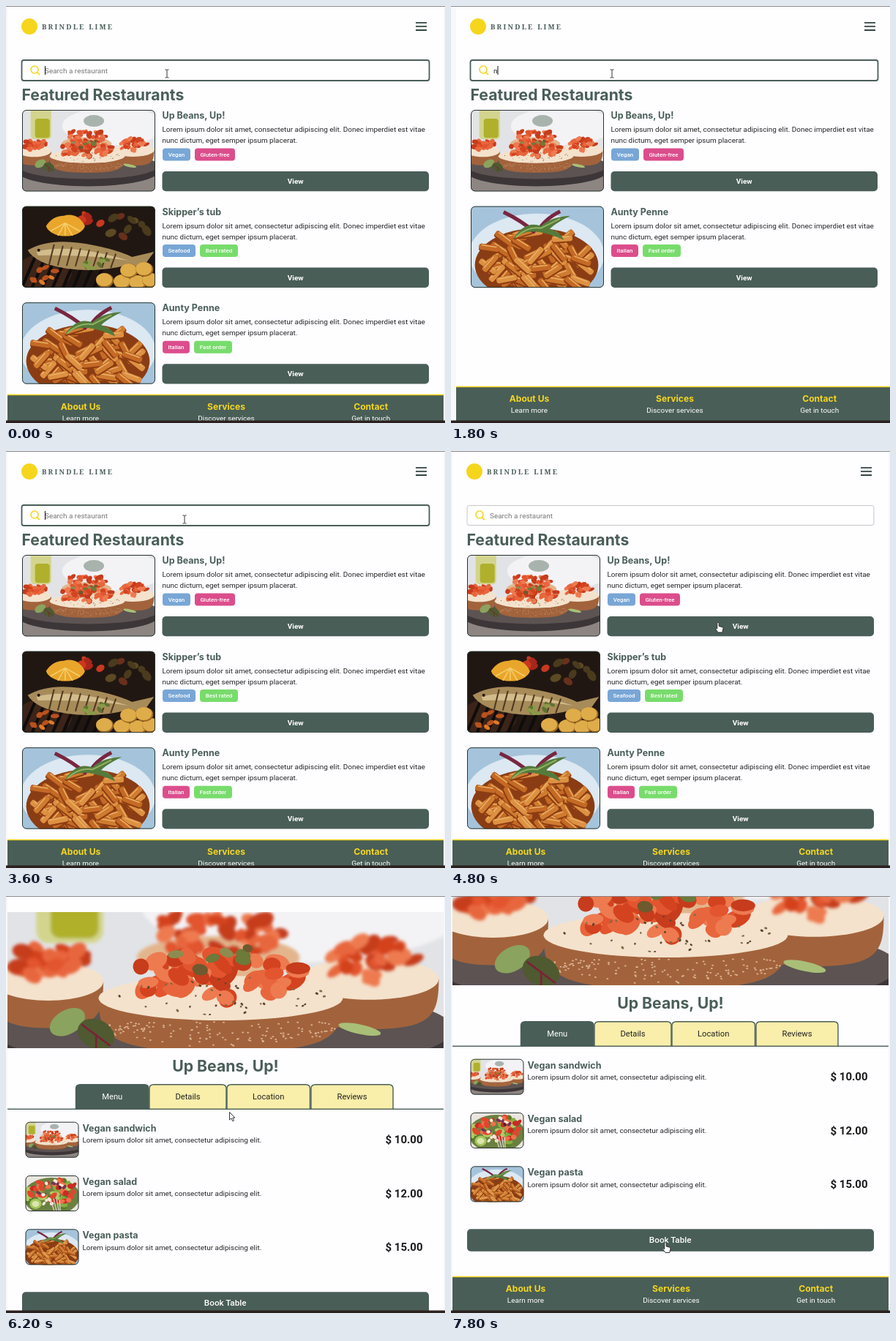
An HTML page for the animation above (8000 ms loop, 600 px wide and 570 px high).

```html
<!DOCTYPE html>
<html lang="en">
<head>
<meta charset="utf-8">
<title>Restaurant finder</title>
<style>
  html, body { margin: 0; width: 100%; height: 100%; overflow: hidden; background: #f8f7f9; }
  svg { display: block; }
  text { font: 9.95px Roboto, sans-serif; fill: #252525; }
  .head { font: 700 21.2px Inter, sans-serif; fill: #495e57; }
  .name { font: 700 12.5px Inter, sans-serif; fill: #495e57; }
  .foot { font: 700 12.1px Inter, sans-serif; fill: #f5d61c; }
  .word { font: 700 9.5px "Noto Serif", serif; letter-spacing: 2.2px; fill: #495e57; }
  .tag { font-size: 8px; font-weight: 500; fill: #fff; }
  .view { font-weight: 700; fill: #fff; }
  .book { font-size: 11.7px; font-weight: 500; fill: #fff; }
  .tab { font-size: 11.2px; fill: #222; }
  .price { font-size: 15px; font-weight: 700; fill: #1c1c1c; }
  .light { fill: #fff; }
  .hint { fill: #757575; }
</style>
</head>
<body>
<svg id="stage" width="600" height="570" viewBox="0 0 600 570"></svg>
<script>
const GREEN = '#495e57', YELLOW = '#f5d61c', PAGE = '#fefdff';
const BLUE = '#78a6d6', PINK = '#dc4d8c', LIME = '#78dc6c';
const CARD_STEP = 131.6, ITEM_STEP = 73.3, MAX_SCROLL = 137;
const LOREM = 'Lorem ipsum dolor sit amet, consectetur adipiscing elit.';

let seed = 7;
const random = () => (seed = (seed * 16807) % 2147483647) / 2147483647;
const between = (a, b) => a + (b - a) * random();
const pick = list => list[Math.floor(random() * list.length)];
const repeat = (n, draw) => Array.from({ length: n }, (_, i) => draw(i)).join('');

const text = (x, y, s, cls = '', anchor = 'start') =>
  `<text x="${x}" y="${y}" class="${cls}" text-anchor="${anchor}">${s}</text>`;
const rect = (x, y, w, h, fill, r = 0, extra = '') =>
  `<rect x="${x}" y="${y}" width="${w}" height="${h}" rx="${r}" fill="${fill}" ${extra}/>`;
const oval = (x, y, rx, ry, fill, turn = 0) =>
  `<ellipse cx="${x}" cy="${y}" rx="${rx}" ry="${ry}" fill="${fill}" transform="rotate(${turn} ${x} ${y})"/>`;
const path = (d, fill, stroke = 'none', width = 1) =>
  `<path d="${d}" fill="${fill}" stroke="${stroke}" stroke-width="${width}"/>`;
const soft = art => `<g filter="url(#soft)">${art}</g>`;

// Chunks of food scattered over an elliptical heap
const heap = (n, x, y, rx, ry, size, colors) => repeat(n, () => {
  const a = between(0, 6.28), d = Math.sqrt(random());
  return oval(x + rx * d * Math.cos(a), y + ry * d * Math.sin(a),
    size * between(.7, 1.2), size * between(.5, .8), pick(colors), between(-60, 60));
});
const TOMATO = ['#e2552f', '#d4431f', '#ee7a50', '#c63c1c', '#e8663d'];

const toast = (x, y, w, h) =>
  path(`M${x - w} ${y}C${x - w} ${y + h * 1.1} ${x - w * .9} ${y + h * 1.5} ${x} ${y + h * 1.5}S${x + w} ${y + h * 1.1} ${x + w} ${y}Z`, '#a2633c') +
  oval(x, y, w, h * .62, '#f4e2cc');

const bruschetta = () =>
  rect(0, 0, 182, 111, '#e2e3e6') +
  soft(oval(125, 22, 70, 26, '#f3f3f6') + rect(12, -6, 28, 46, '#d3d58e', 5) +
    rect(18, 12, 20, 26, '#b0b02c', 4) + oval(98, 15, 14, 8, '#a9b3ad')) +
  rect(0, 90, 182, 21, '#8d8581') + oval(90, 82, 98, 22, '#3d3638') + oval(90, 76, 96, 18, '#5c5352') +
  soft(oval(88, 46, 34, 9, '#e3b58c') + heap(40, 87, 36, 28, 9, 4, TOMATO)) +
  toast(17, 56, 23, 13) + soft(heap(28, 19, 48, 17, 7, 4, TOMATO)) +
  toast(151, 55, 29, 14) + soft(heap(30, 152, 47, 19, 8, 4, TOMATO)) +
  toast(89, 63, 51, 15) + repeat(140, () => {
    const x = between(42, 137);
    return oval(x, between(73, 85 - Math.abs(x - 89) / 7), .45, .3, '#dbb392');
  }) +
  heap(55, 88, 54, 36, 10, 4.5, TOMATO) + heap(7, 88, 47, 28, 7, 3, ['#6c7a3a', '#6e5a2e', '#8c8c50']) +
  heap(40, 89, 62, 44, 8, .6, ['#5a4630', '#7a6b45']) +
  oval(25, 73, 8, 5, '#8aa35e', -30) + oval(37, 78, 8, 6, '#4f5a30', 25) +
  path('M31 74L43 83M37 78V84', 'none', '#7c2136', .8) + oval(147, 76, 9, 2, '#a9bf78', 12);

const fish = () =>
  rect(0, 0, 182, 111, '#211712') + oval(30, 90, 38, 25, '#3c2418') +
  repeat(8, i => path(`M${i * 14} 111L${i * 14 + 22} 60`, 'none', '#0f0c0b', 4)) +
  heap(8, 25, 92, 22, 14, 5, ['#b9511d', '#6d2c18', '#e07a25']) +
  heap(9, 145, 28, 32, 16, 7, ['#4a3b1e', '#5c4a24', '#68301c']) +
  heap(7, 98, 17, 18, 9, 6, ['#a9261a', '#c8391f']) +
  path('M33 27A27 17 0 0 0 86 27Q76 8 57 13Q42 13 33 27Z', '#e9a62b') +
  repeat(5, i => path(`M59 23L${39 + i * 10} ${37 + (i % 4 ? 3 : -3)}`, 'none', '#f5ce6c', 1.5)) +
  path('M8 60Q35 44 78 50T150 69L180 62L170 76L176 90L147 79Q105 91 62 85T8 60Z', '#a78b59') +
  path('M20 62Q65 50 145 74Q92 66 22 67Z', '#d3bc8b') +
  repeat(8, i => path(`M${44 + i * 12} ${52 + i * 1.8}L${37 + i * 12} ${80 + i * .6}`, 'none', '#4d3820', 2)) +
  oval(23, 60, 2, 2, '#25170e') + heap(10, 102, 78, 20, 8, 4, ['#607231', '#8a9a48']) +
  [[113, 101], [137, 103], [158, 104], [176, 101], [146, 88], [167, 86]]
    .map(([x, y]) => oval(x, y, 12, 10, '#9b6722') + oval(x - 1, y - 1, 11, 9, '#dfac4a')).join('');

const pasta = () =>
  rect(0, 0, 182, 111, '#a5c4db') + oval(90, 66, 92, 56, '#dce8f2') +
  oval(90, 80, 84, 50, '#8a3d14') +
  repeat(75, () => {
    const a = between(0, 6.28), d = Math.sqrt(random()), turn = between(-50, 65);
    const x = 90 + 74 * d * Math.cos(a), y = 78 + 44 * d * Math.sin(a);
    return `<g transform="translate(${x} ${y}) rotate(${turn})">` +
      rect(-14, -5, 28, 10, '#8d3c12', 3) + rect(-14, -5, 28, 8, pick(['#cf7c30', '#dd9142', '#c46a25']), 3) +
      rect(-11, -4, 21, 1.5, '#ebb066', 1) + '</g>';
  }) +
  path('M88 36Q70 20 45 8M92 34Q100 18 122 7', 'none', '#792640', 5) +
  path('M92 35Q72 32 58 45Q74 19 96 27Q110 14 136 13Q114 24 108 31Q124 36 127 46Q107 37 92 35Z', '#547b3c') +
  path('M62 42Q78 27 96 30L122 17', 'none', '#91b163', 2);

const salad = () =>
  rect(0, 0, 72, 48, '#e9e5df') + oval(35, 28, 38, 25, '#6b8040') +
  heap(24, 34, 25, 34, 20, 6, ['#86ad3f', '#587a2a', '#b4c965']) +
  heap(34, 37, 21, 31, 17, 5, ['#e2452e', '#c92c20', '#f0724c']) +
  heap(14, 36, 23, 28, 16, 3, ['#f4ead8', '#4b2434', '#f4ead8', '#743553']) +
  oval(14, 38, 8, 7, '#a4c65d') + oval(14, 38, 5, 4, '#dbe6ad') +
  path('M34 32L39 48M38 31L42 48M42 31L45 48M46 33L47 48', 'none', '#d9d0c8', 1.3);

const symbol = (id, w, h, art) =>
  `<symbol id="${id}" viewBox="0 0 ${w} ${h}" preserveAspectRatio="xMidYMid slice">${art}</symbol>`;
const clip = (id, w, h) => `<clipPath id="${id}">${rect(0, 0, w, h, '#000', 6)}</clipPath>`;
const photo = (id, x, y, w, h, clipId) =>
  `<g transform="translate(${x} ${y})"><g clip-path="url(#${clipId})"><use href="#${id}" width="${w}" height="${h}"/></g>` +
  rect(.5, .5, w - 1, h - 1, 'none', 5.5, 'stroke="#26332f"') + '</g>';

const header = rect(2, 0, 596, 60, PAGE) + oval(32, 28, 11, 11, YELLOW) + text(49, 32.3, 'BRINDLE LIME', 'word') +
  path('M560 22.8H575M560 27.9H575M560 33H575', 'none', '#34453f', 1.8);

const footer = rect(2, 520, 596, 60, GREEN) + rect(2, 519.7, 596, 1.5, YELLOW) +
  [[102, 'About Us', 'Learn more'], [301, 'Services', 'Discover services'], [498.7, 'Contact', 'Get in touch']]
    .map(([x, title, line]) => text(x, 540.5, title, 'foot', 'middle') + text(x, 555.7, line, 'light', 'middle')).join('');

const pill = (x, w, color, label) => rect(x, 194.5, w, 17, color, 4) + text(x + w / 2, 205.8, label, 'tag', 'middle');

const card = (i, art, name, pills) => `<g id="card${i}">` +
  photo(art, 22, 142, 182, 111.5, 'cardClip') + text(213.5, 154.3, name, 'name') +
  text(213.5, 172.2, LOREM + ' Donec imperdiet est vitae') +
  text(213.5, 187.2, 'nunc dictum, eget semper ipsum placerat.') +
  pills.map(p => pill(...p)).join('') +
  rect(213.5, 226, 364.5, 27.3, GREEN, 5) + text(395.7, 243.2, 'View', 'view', 'middle') + '</g>';

const listPage = `<g id="list">${rect(2, 0, 596, 570, PAGE)}${header}
  <rect id="box" fill="#fff" rx="3"/>
  <circle cx="39" cy="87" r="5" fill="none" stroke="${YELLOW}" stroke-width="1.6"/>
  ${path('M42.6 90.7L46 94.2', 'none', YELLOW, 1.7)}
  <text id="query" x="53" y="91.5"></text>
  <rect id="caret" y="82" width="1" height="12" fill="#111"/>
  ${text(21.5, 129, 'Featured Restaurants', 'head')}
  ${card(0, 'bruschetta', 'Up Beans, Up!', [[214, 38, BLUE, 'Vegan'], [258, 55, PINK, 'Gluten-free']])}
  ${card(1, 'fish', 'Skipper’s tub', [[214, 45, BLUE, 'Seafood'], [265, 52, LIME, 'Best rated']])}
  ${card(2, 'pasta', 'Aunty Penne', [[214, 37, PINK, 'Italian'], [257, 52, LIME, 'Fast order']])}
  <g id="listFooter">${footer}</g></g>`;

const tab = (x, end, label, active) =>
  path(`M${x} 205V177Q${x} 171.7 ${x + 6} 171.7H${end - 6}Q${end} 171.7 ${end} 177V205`, active ? GREEN : '#f9eeaa', GREEN, 1.4) +
  text((x + end) / 2, 192, label, active ? 'tab light' : 'tab', 'middle');

const item = (i, art, name, price) => `<g transform="translate(0 ${i * ITEM_STEP})">` +
  photo(art, 26.5, 222.7, 73, 49, 'itemClip') + text(104.5, 235.8, name, 'name') +
  text(104.5, 251, LOREM) + text(569.6, 252.3, price, 'price', 'end') + '</g>';

// Laid out as seen when scrolled to the bottom
const detailPage = `<g id="detail">${rect(2, -MAX_SCROLL, 596, 800, PAGE)}
  <g transform="translate(0 ${-MAX_SCROLL})">${header}</g>
  <use href="#bruschetta" x="2" y="-64" width="596" height="186"/>
  ${text(300, 153.8, 'Up Beans, Up!', 'head', 'middle')}
  ${tab(95.5, 195, 'Menu', true)}${tab(196, 301, 'Details')}${tab(302, 415.5, 'Location')}${tab(417, 529, 'Reviews')}
  ${rect(2, 204.6, 596, 1.4, GREEN)}
  ${item(0, 'bruschetta', 'Vegan sandwich', '$ 10.00')}
  ${item(1, 'salad', 'Vegan salad', '$ 12.00')}
  ${item(2, 'pasta', 'Vegan pasta', '$ 15.00')}
  ${rect(22, 455.3, 556, 30.4, GREEN, 5)}${text(299.7, 474, 'Book Table', 'book', 'middle')}
  ${footer}</g>`;

const cursors = {
  beam: path('M-2.5 -5.5H-.5L0 -5L.5 -5.5H2.5M0 -5V5M-2.5 5.5H-.5L0 5L.5 5.5H2.5', 'none', '#333', 1),
  arrow: path('M0 0V10.5L2.4 8.3L4.2 12.2L6 11.4L4.3 7.6H7.4Z', '#fff', '#222', .9),
  hand: path('M-1.2 1Q0 -1 1.2 1V5.5L6 6.7Q7 7.2 7 8.5L5.8 14H0L-3.6 9Q-3.4 7.3 -1.2 9Z', '#fff', '#222', .9)
};

const stage = document.getElementById('stage');
stage.innerHTML = `<defs><filter id="soft"><feGaussianBlur stdDeviation=".7"/></filter>
  ${symbol('bruschetta', 182, 111, bruschetta())}${symbol('fish', 182, 111, fish())}
  ${symbol('pasta', 182, 111, pasta())}${symbol('salad', 72, 48, salad())}
  ${clip('cardClip', 182, 111.5)}${clip('itemClip', 73, 49)}</defs>
  ${rect(0, 0, 600, 570, '#f8f7f9')}${listPage}${detailPage}
  ${rect(0, 0, 600, 1, '#8b898b')}${rect(0, 566.5, 600, 4, '#2b211f')}
  <g id="cursor"></g>`;

const $ = id => document.getElementById(id);
const set = (id, attrs) => Object.entries(attrs).forEach(([k, v]) => $(id).setAttribute(k, v));
const show = (id, on) => { $(id).style.display = on ? '' : 'none'; };
const shift = (id, x, y) => set(id, { transform: `translate(${x} ${y})` });

const LOOP = 8000, STEP = 200;
const TYPED = 1400, CLEARED = 2800, BLURRED = 4600, OPENED = 5200;
const MOUSE = [[0, 220, 92.5], [2800, 220, 92.5], [3600, 244, 93.5], [4600, 365, 234], [5000, 365, 234],
  [6200, 305.5, 295.5], [7000, 299, 413], [7800, 293, 473.5], [8000, 293, 473.5]];

function mouseAt(t) {
  const i = MOUSE.findIndex(k => k[0] > t);
  const [t0, x0, y0] = MOUSE[i - 1], [t1, x1, y1] = MOUSE[i];
  const p = (t - t0) / (t1 - t0);
  return [x0 + (x1 - x0) * p, y0 + (y1 - y0) * p];
}

function scrollAt(t) {
  const p = Math.min(1, Math.max(0, (t - 6000) / 600));
  return Math.round(MAX_SCROLL * (1 - (1 - p) ** 1.15));
}

function cursorFor(x, y, opened) {
  if (opened) return y > 456 && y < 486 ? 'hand' : 'arrow';
  if (y > 73 && y < 102) return 'beam';
  return x > 213 && y > 226 && y < 253 ? 'hand' : 'arrow';
}

function render(time) {
  const t = Math.floor((time % LOOP) / STEP) * STEP;
  const filtered = t >= TYPED && t < CLEARED, focused = t < BLURRED, opened = t >= OPENED;

  show('list', !opened);
  show('detail', opened);
  show('card1', !filtered);
  show('caret', focused);
  shift('list', filtered ? 5 : 0, 0);
  shift('listFooter', 0, filtered ? 0 : 11);
  shift('card1', 0, CARD_STEP);
  shift('card2', 0, CARD_STEP * (filtered ? 1 : 2));
  shift('detail', 0, MAX_SCROLL - scrollAt(t));

  set('box', focused
    ? { x: 21.5, y: 74, width: 557, height: 28, stroke: GREEN, 'stroke-width': 1.8 }
    : { x: 22, y: 74.5, width: 556, height: 27, stroke: '#c6c6ca', 'stroke-width': 1 });
  $('query').textContent = filtered ? 'n' : 'Search a restaurant';
  set('query', { class: filtered ? '' : 'hint' });
  set('caret', { x: filtered ? 58.5 : 53 });

  const [x, y] = mouseAt(t);
  $('cursor').innerHTML = cursors[cursorFor(x, y, opened)];
  shift('cursor', x, y);
}

const start = performance.now();
(function tick() {
  render(performance.now() - start);
  requestAnimationFrame(tick);
})();
</script>
</body>
</html>
```
